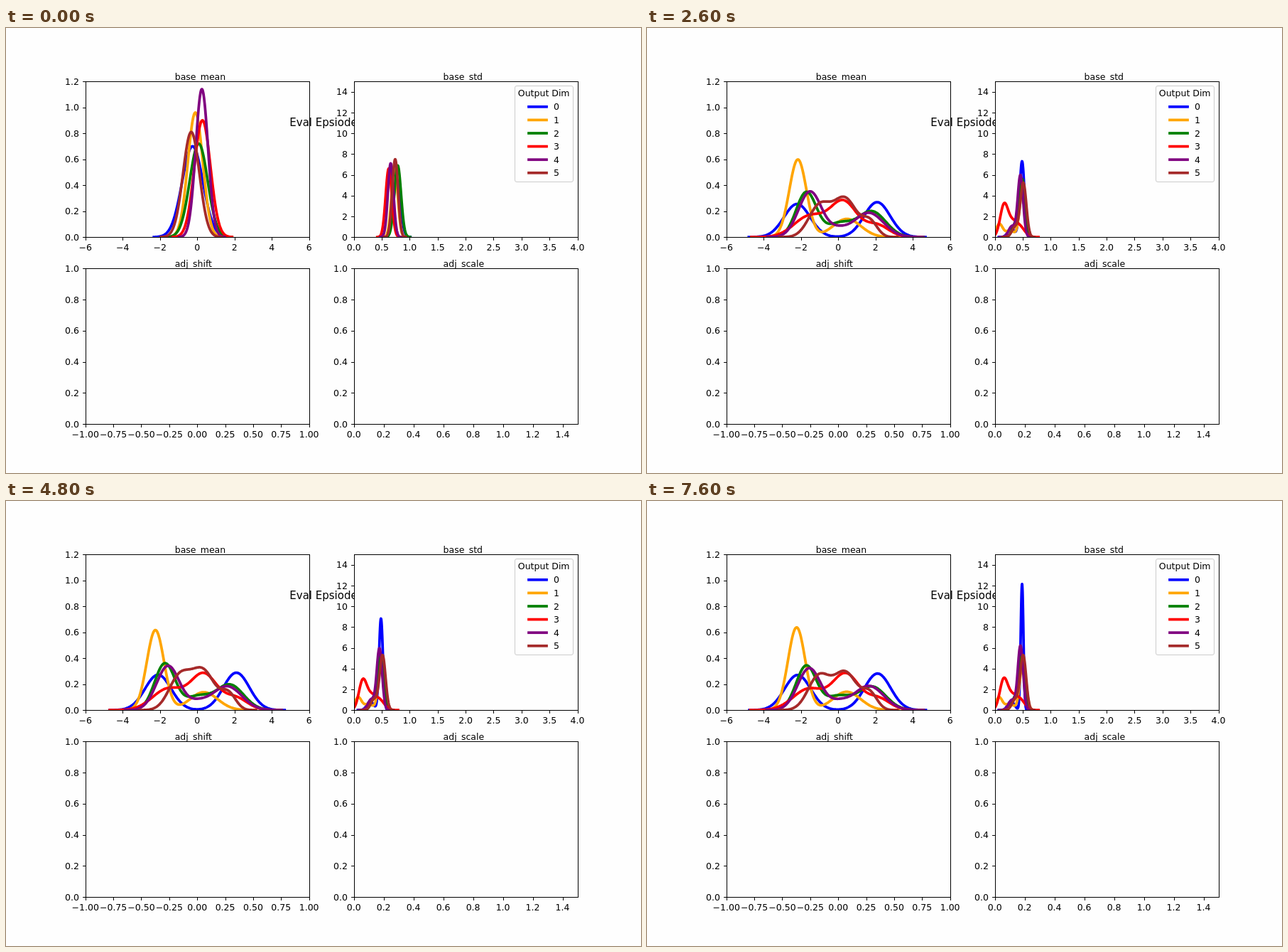
Animation, 894 px wide and 626 px high, one loop 7.8 s. Source, as an HTML page:

```html
<!DOCTYPE html>
<html>
<head>
<meta charset="utf-8">
<style>
  html, body { margin: 0; width: 100%; height: 100%; overflow: hidden; background: #fefefe; }
  svg { display: block; font: 12.5px "DejaVu Sans", sans-serif; }
  .curve { fill: none; stroke-width: 3.75; stroke-linejoin: round; stroke-linecap: square; }
  .axis { fill: none; stroke: #000; }
</style>
</head>
<body>
<svg id="stage" width="894" height="626" viewBox="0 0 894 626"></svg>
<script>
const W = 314.9, H = 219.1, STEP = 200, LOOP = 7800, SETTLE = 350;
const panels = [
  { title: 'base_mean', x: 111.75, y: 75.1, x0: -6, x1: 6, dx: 2, xd: 0, y1: 1.2, dy: 0.2, yd: 1 },
  { title: 'base_std', x: 489.65, y: 75.1, x0: 0, x1: 4, dx: 0.5, xd: 1, y1: 15, dy: 2, yd: 0 },
  { title: 'adj_shift', x: 111.75, y: 338.05, x0: -1, x1: 1, dx: 0.25, xd: 2, y1: 1, dy: 0.2, yd: 1 },
  { title: 'adj_scale', x: 489.65, y: 338.05, x0: 0, x1: 1.5, dx: 0.2, xd: 1, y1: 1, dy: 0.2, yd: 1 }
];

// A bell is [centre, width, height]. Each curve is one bell that splits into several.
const dims = [
  { color: 'blue', sharpen: 1,
    mean: { from: [-.25, .56, .7], to: [[-2.15, .7, .26], [2.05, .7, .28]] },
    std: { from: [.77, .065, 5.5], to: [[.485, .047, 6.5], [.29, .06, .8]] } },
  { color: 'orange',
    mean: { from: [-.1, .4, .96], to: [[-2.2, .46, .61], [.4, .75, .14]] },
    std: { from: [.73, .055, 6.8], to: [[.5, .055, 4.7], [.08, .06, 1.2], [.27, .08, .6]] } },
  { color: 'green',
    mean: { from: [.08, .48, .72], to: [[-1.72, .55, .35], [1.8, .75, .19], [0, .65, .1]] },
    std: { from: [.785, .06, 6.9], to: [[.49, .048, 5.3], [.37, .06, 1.3]] } },
  { color: 'red',
    mean: { from: [.28, .43, .9], to: [[-1.5, .85, .16], [.35, .7, .27], [2.1, .65, .09]] },
    std: { from: [.625, .055, 6.6], to: [[.16, .07, 2.9], [.3, .08, 1.2], [.45, .09, 1]] } },
  { color: 'purple',
    mean: { from: [.25, .33, 1.14], to: [[-1.53, .62, .34], [1.6, .8, .18], [0, .5, .05]] },
    std: { from: [.66, .05, 7.1], to: [[.46, .048, 5.9], [.31, .06, 1]] } },
  { color: 'brown',
    mean: { from: [-.32, .44, .81], to: [[-1, .58, .25], [.35, .62, .29], [1.7, .4, .12]] },
    std: { from: [.74, .052, 7.5], to: [[.51, .053, 5.3], [.36, .06, 1]] } }
];

const snap = v => Math.round(v) + 0.5;
const text = (s, x, y, anchor = 'start', size = 12.5) =>
  `<text x="${x}" y="${y}" text-anchor="${anchor}" font-size="${size}">${s}</text>`;
const label = (v, digits) => v.toFixed(digits).replace(/^-(?=0\.?0*$)/, '').replace('-', '\u2212');
const toX = (p, v) => p.x + (v - p.x0) / (p.x1 - p.x0) * W;
const toY = (p, v) => p.y + H - v / p.y1 * H;

function panel(p, i) {
  const left = snap(p.x), top = snap(p.y), right = snap(p.x + W), bottom = snap(p.y + H);
  let ticks = '', labels = '';
  for (let v = p.x0; v < p.x1 + 1e-6; v += p.dx) {
    ticks += `M${snap(toX(p, v))} ${bottom}v4.4`;
    labels += text(label(v, p.xd), toX(p, v), Math.round(p.y + H + 18.6), 'middle');
  }
  for (let v = 0; v < p.y1 + 1e-6; v += p.dy) {
    ticks += `M${left} ${snap(toY(p, v))}h-4.4`;
    labels += text(label(v, p.yd), p.x - 8.75, Math.round(toY(p, v) + 4.7), 'end');
  }
  const box = `x="${left}" y="${top}" width="${right - left}" height="${bottom - top}"`;
  const curves = i < 2 ? dims.map(d => `<path class="curve" stroke="${d.color}"/>`).join('') : '';
  return `<clipPath id="clip${i}"><rect ${box}/></clipPath><rect ${box} fill="#fefefe"/>
    <g id="curves${i}" clip-path="url(#clip${i})">${curves}</g>
    <rect class="axis" ${box}/><path class="axis" d="${ticks}"/>${labels}
    ${text(p.title, p.x + 0.4 * W, Math.round(p.y - 2))}`;
}

const legend = '<rect x="716.5" y="81.5" width="82" height="135" rx="2.5" fill="#fefefe" fill-opacity=".8" stroke="#ccc"/>'
  + text('Output Dim', 757.2, 96, 'middle')
  + dims.map((d, i) => {
    const y = 110.8 + 18.6 * i;
    return `<path class="curve" stroke="${d.color}" d="M736 ${y}h25"/>` + text(i, 771, Math.round(y + 4.5));
  }).join('');

// The heading lies over the left panel and under the right one.
const [first, ...rest] = panels.map(panel);
document.getElementById('stage').innerHTML =
  first + text('Eval Epsiode', 447, 138, 'middle', 15) + rest.join('') + legend;

// Seeded noise in -1..1
function noise(seed) {
  const s = Math.sin(seed * 12.9898) * 43758.5453;
  return (s - Math.floor(s)) * 2 - 1;
}

function bellsAt(curve, t, seed, sharpen) {
  const k = 1 - Math.exp(-t / SETTLE);
  const mix = (a, b) => a + (b - a) * k;
  const [c0, w0, h0] = curve.from;
  return curve.to.map(([c, w, h], i) => {
    const gain = i ? 1 : 1 + sharpen * (t / LOOP) ** 2;
    const n = seed + i * 7 + t / STEP * 101;
    return {
      c: mix(c0, c) + noise(n) * 0.1 * w * k,
      w: mix(w0, w / gain),
      h: mix(h0 / curve.to.length, h * gain) * (1 + noise(n + 3) * 0.05 * k)
    };
  });
}

function curvePath(bells, p) {
  const lo = Math.min(...bells.map(b => b.c - 3.7 * b.w));
  const hi = Math.max(...bells.map(b => b.c + 3.7 * b.w));
  const points = [];
  for (let n = 0; n <= 200; n++) {
    const x = lo + (hi - lo) * n / 200;
    const y = bells.reduce((sum, b) => sum + b.h * Math.exp(-(((x - b.c) / b.w) ** 2) / 2), 0);
    points.push(toX(p, x).toFixed(2) + ' ' + toY(p, y).toFixed(2));
  }
  return 'M' + points.join('L');
}

const groups = [0, 1].map(i => document.getElementById('curves' + i).children);
const start = performance.now();
let shown = -1;

function draw(now) {
  const t = Math.floor(Math.max(0, now - start) % LOOP / STEP) * STEP;
  if (t !== shown) {
    shown = t;
    dims.forEach((d, i) => {
      groups[0][i].setAttribute('d', curvePath(bellsAt(d.mean, t, i * 29, 0), panels[0]));
      groups[1][i].setAttribute('d', curvePath(bellsAt(d.std, t, i * 29 + 13, d.sharpen || 0), panels[1]));
    });
  }
  requestAnimationFrame(draw);
}
draw(start);
</script>
</body>
</html>
```
